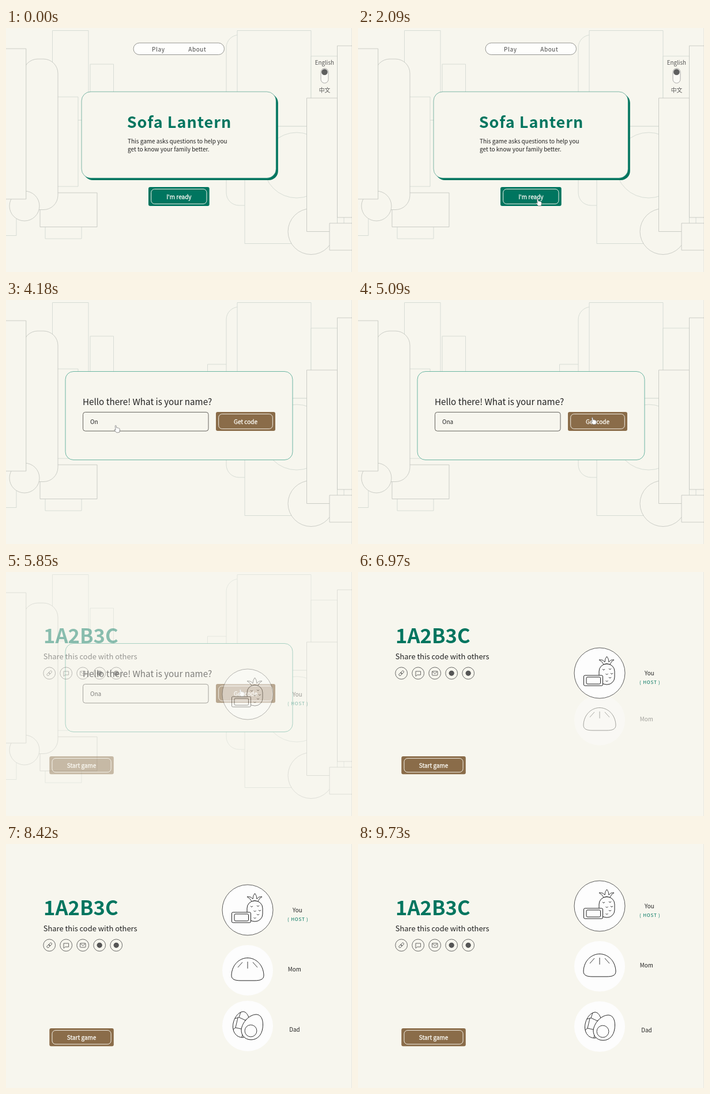
These frames come from a looping animation (600x425 px, 10000 ms). An HTML page with a canvas:

```html
<!DOCTYPE html>
<html lang="en">
<head>
<meta charset="utf-8">
<title>Family game</title>
<style>
html, body { margin: 0; width: 100%; height: 100%; overflow: hidden; background: #f7f6ee; }
canvas { display: block; width: 600px; height: 425px; }
</style>
</head>
<body>
<canvas id="stage"></canvas>
<script>
const W = 600, H = 425, LOOP = 10000;
const PAPER = '#f7f6ee', GREEN = '#00755f', BROWN = '#8a6c49', INK = '#222';
const FONT = '"Noto Sans CJK SC", "Noto Sans CJK TC", "Noto Sans CJK JP", "Noto Sans", sans-serif';
const NAME = 'Ona';

const dpr = window.devicePixelRatio || 1;
const stage = document.getElementById('stage');
const buffer = document.createElement('canvas');
for (const c of [stage, buffer]) {
  c.width = W * dpr;
  c.height = H * dpr;
}
const main = stage.getContext('2d');
const side = buffer.getContext('2d');
let ctx = main;

const clamp = v => Math.max(0, Math.min(1, v));
const part = (t, a, b) => clamp((t - a) / (b - a));
const smooth = v => v * v * (3 - 2 * v);
const mix = (a, b, p) => a + (b - a) * p;
// Quick start with a long tail
const settle = (t, start) => t < start ? 0 : 1 - Math.exp((start - t) / 208);

// Draws a group as one sheet with its own opacity
function layer(alpha, draw) {
  if (alpha <= 0) return;
  if (alpha >= 1) return draw();
  side.setTransform(dpr, 0, 0, dpr, 0, 0);
  side.clearRect(0, 0, W, H);
  ctx = side;
  draw();
  ctx = main;
  ctx.globalAlpha = alpha;
  ctx.drawImage(buffer, 0, 0, W, H);
  ctx.globalAlpha = 1;
}

function paint(fill, stroke, width = 0.8) {
  if (fill) { ctx.fillStyle = fill; ctx.fill(); }
  if (stroke) { ctx.strokeStyle = stroke; ctx.lineWidth = width; ctx.stroke(); }
}

// Box given by its edges
function box(x1, y1, x2, y2, r, fill, stroke, width) {
  ctx.beginPath();
  ctx.roundRect(x1, y1, x2 - x1, y2 - y1, r);
  paint(fill, stroke, width);
}

function disc(x, y, r, fill, stroke, width) {
  ctx.beginPath();
  ctx.arc(x, y, r, 0, Math.PI * 2);
  paint(fill, stroke, width);
}

function path(d, fill, stroke, width) {
  const p = new Path2D(d);
  if (fill) { ctx.fillStyle = fill; ctx.fill(p); }
  if (stroke) { ctx.strokeStyle = stroke; ctx.lineWidth = width || 0.8; ctx.stroke(p); }
}

function text(s, x, y, size, color = INK, { weight = 400, align = 'left', gap = 0, edge = 0 } = {}) {
  ctx.font = `${weight} ${size}px ${FONT}`;
  ctx.letterSpacing = gap + 'px';
  ctx.textAlign = align;
  ctx.fillStyle = color;
  ctx.fillText(s, x, y);
  if (edge) {
    ctx.strokeStyle = color;
    ctx.lineWidth = edge;
    ctx.strokeText(s, x, y);
  }
}

function button(x1, y1, x2, y2, label, fill) {
  box(x1, y1, x2, y2, 3, fill);
  box(x1 + 4.7, y1 + 3.6, x2 - 4.7, y2 - 3.6, 6, null, '#f3f0e6', 1);
  text(label, (x1 + x2) / 2, (y1 + y2) / 2 + 4, 10, '#fbfaf4', { align: 'center', edge: 0.3 });
}

function backdrop() {
  const light = '#cfd6cf', dark = '#bfc2bb';
  const tile = (x1, y1, x2, y2, c = light, r = 0) => box(x1, y1, x2, y2, r, PAPER, c, 0.8);
  // left
  tile(80.5, 4.5, 143, 160.5);
  tile(146, 63, 186.5, 200);
  tile(89, 120, 125, 276);
  tile(68, 340, 131, 367);
  tile(59, 287, 158, 346.5, dark);
  tile(30, 54, 90, 316.5, dark, 25);
  tile(-5, 280, 18, 361.5);
  disc(32, 310, 26, PAPER, dark);
  tile(-5, 36, 34.8, 298, dark);
  // right
  tile(349.5, 112, 400, 200);
  tile(382, 12, 450, 309, light, 22);
  tile(414, 171, 522, 375.5);
  disc(504, 239, 57, null, light);
  tile(401, 4.5, 529, 171);
  tile(529, 49, 575, 130);
  disc(529, 354.5, 40, PAPER, dark);
  tile(521.5, 122, 574.5, 354.5, dark);
  tile(574.5, 310, 586, 350);
  tile(574.5, 31, 605, 330, dark);
  tile(561, 340, 605, 387, dark);
}

function home() {
  box(221, 26, 378.5, 46.5, 10.2, '#fefefc', '#7c7c78', 0.8);
  text('Play', 264.3, 40.8, 10, '#444', { align: 'center', gap: 0.6 });
  text('About', 331.8, 40.8, 10, '#444', { align: 'center', gap: 0.6 });

  text('English', 552.3, 64, 9.8, '#555', { align: 'center' });
  box(546, 70.3, 559, 96, 6.5, '#fbfaf5', '#999', 0.8);
  disc(552.4, 76.8, 5.3, '#5f5f5f');
  text('中文', 552.5, 111.5, 9.8, '#555', { align: 'center' });

  box(134.5, 114.5, 471.8, 265, 16, GREEN);
  box(131, 111, 468.3, 261.4, 16, PAPER, GREEN, 0.5);
  text('Sofa Lantern', 300.5, 174.3, 27, GREEN, { weight: 700, align: 'center', gap: 1 });
  text('This game asks questions to help you', 211, 200.7, 10);
  text('get to know your family better.', 211, 215.2, 10);
  button(247, 277, 352.7, 310, "I'm ready", GREEN);
}

function form(t) {
  const typed = NAME.slice(0, Math.max(0, Math.floor((t - 3650) / 180)));
  box(103, 124.5, 497, 278.5, 14, PAPER, '#5cae9a', 0.9);
  text('Hello there! What is your name?', 133, 183.3, 15.2);
  box(133.5, 195.4, 351, 228.2, 4, null, '#55534e', 0.9);
  text(typed || 'your name', 146, 215.6, 10, typed ? INK : '#aaa79f');
  button(364, 195, 467, 228, 'Get code', typed ? BROWN : '#afa497');
}

function shareIcons() {
  const c = '#444', y = 176.3;
  for (let i = 0; i < 5; i++) disc(75.2 + i * 29, y, 10.4, null, c, 0.8);
  for (const s of [-1, 1]) {
    ctx.save();
    ctx.translate(75.2, y);
    ctx.rotate(-Math.PI / 4);
    box(s * 2.3 - 3, -1.8, s * 2.3 + 3, 1.8, 1.8, null, c, 0.8);
    ctx.restore();
  }
  path('M100 173 h8.6 v6.2 h-5.8 l-2.8 2.3 z', null, c, 0.8);
  box(128.5, 172.8, 138, 180, 1, null, c, 0.8);
  path('M128.8 173.3 l4.5 3.7 l4.5 -3.7', null, c, 0.8);
  disc(162.2, y, 4.6, '#555');
  disc(191.2, y, 4.6, '#555');
}

function sharePanel() {
  text('1A2B3C', 65, 123.5, 34.6, GREEN, { weight: 700 });
  text('Share this code with others', 64.8, 151.8, 12.9);
  shareIcons();
  button(75.3, 321, 186.8, 352.3, 'Start game', BROWN);
}

function pineapple() {
  box(-1, -16, 26, 20, 13, null, INK, 1);
  path('M7 -15 Q4 -21 -1 -23 Q6 -24 9 -19 Q9 -25 12.5 -29 Q16 -25 16 -19 ' +
    'Q19 -24 25 -23 Q20 -21 18 -15 Q12 -18 7 -15 Z', '#fdfdfd', INK, 0.9);
  const eyes = [[7, -6], [18, -7], [12.5, 2], [18, 8], [12.5, 14], [21, 1]];
  for (const [x, y] of eyes) path(`M${x - 2} ${y - 1} l2 2 l2 -2`, null, INK, 0.9);
  box(-27.5, 4, 5.5, 22, 2, '#fdfdfd', INK, 1);
  box(-23, 7, 1.5, 19, 2, null, INK, 1);
}

function bun() {
  path('M-28 8 C-27 -10 -14 -21.5 0 -21.5 C14 -21.5 27 -10 28 8 ' +
    'C28.5 16 22 18 12 18 L-12 18 C-22 18 -28.5 16 -28 8 Z', null, INK, 1);
  path('M-9 -14 L-17 -5 M0 -15 V-3 M9 -14 L17 -5', null, INK, 0.9);
}

function eggs() {
  path('M-8 -25 C-18 -24 -26 -10 -25.5 2 C-25 13 -18 20 -9 20 C0 20 6 12 5 0 C4 -12 0 -25 -8 -25 Z',
    null, INK, 1);
  path('M-22 -13 L-15 -15 L-4 -10 L2 -14 M-17 -14 L-21 3 L-7 6 L-4 -10 M-21 3 L-25 6 M-7 6 L-10 20 M-15 -15 L-12 -24',
    null, INK, 0.9);
  path('M15 -20 C24 -20 28 -9 26 4 C24 17 16 24 6 24 C-5 24 -11 16 -11 7 C-10 -6 3 -20 15 -20 Z',
    '#fdfdfd', INK, 1);
  disc(5.5, 8.5, 10.4, null, INK, 0.9);
}

function player(y, label, x, dy, food, host) {
  disc(419, y, 44, '#fdfdfd', host && '#333', 0.8);
  ctx.save();
  ctx.translate(419, y);
  ctx.lineJoin = 'round';
  food();
  ctx.restore();
  text(label, x, y + dy + 3.7, 9.8, INK, { align: 'center' });
  if (host) text('( HOST )', 506.3, y + 18.6, 8, GREEN, { align: 'center', gap: 0.8 });
}

function lobby(t, shown) {
  const mom = 6718, dad = 8000;
  const m = settle(t, mom), d = settle(t, dad);
  const fade = start => part(t, start + 155, start + 400);
  layer(fade(dad), () => player(mix(310, 318, d), 'Dad', 500.5, 6, eggs));
  layer(fade(mom), () => player(mix(240, 265.5, m) - 52.5 * d, 'Mom', 500.3, -2, bun));
  layer(shown, () => {
    sharePanel();
    player(213 - 52.5 * m - 52.5 * d, 'You', 505.4, 0, pineapple, true);
  });
}

// time, x, y of the fingertip
const TRACK = [
  [450, 573, 309], [1850, 309, 297], [2550, 309, 297], [3180, 188, 218],
  [4250, 188, 218], [4950, 404, 204], [LOOP, 404, 204]
];

function hand(t) {
  if (t < 450) return;
  const i = TRACK.findIndex(k => k[0] > t);
  const [t1, x1, y1] = TRACK[i - 1], [t2, x2, y2] = TRACK[i];
  const p = smooth(part(t, t1, t2));
  ctx.save();
  ctx.translate(mix(x1, x2, p), mix(y1, y2, p));
  ctx.lineJoin = 'round';
  path('M1.2 1.2 Q2.2 -0.2 3.2 1.2 L3.9 4.8 Q5 4 5.7 5 Q6.8 4.4 7.4 5.4 Q8.6 5 9 6.4 ' +
    'L9.4 9 L8.6 12.6 L3.8 13 L0 8.8 Q-0.4 7.6 0.8 7.6 L2.2 8.4 Z', '#fff', '#666', 0.7);
  ctx.restore();
}

function draw(t) {
  main.setTransform(dpr, 0, 0, dpr, 0, 0);
  main.fillStyle = PAPER;
  main.fillRect(0, 0, W, H);

  const toForm = smooth(part(t, 2130, 2420));
  const toLobby = smooth(part(t, 5640, 6100));
  if (toLobby === 0) {
    backdrop();
    layer(1 - toForm, home);
    layer(toForm, () => form(t));
    layer(part(t, 450, 550), () => hand(t));
  } else {
    layer(1 - toLobby, () => { backdrop(); form(t); hand(t); });
    lobby(t, toLobby);
  }

  main.fillStyle = 'rgba(0, 0, 0, 0.06)';
  main.fillRect(599, 0, 1, H);
}

const begin = performance.now();
function tick() {
  draw((performance.now() - begin) % LOOP);
  requestAnimationFrame(tick);
}
tick();
</script>
</body>
</html>
```
